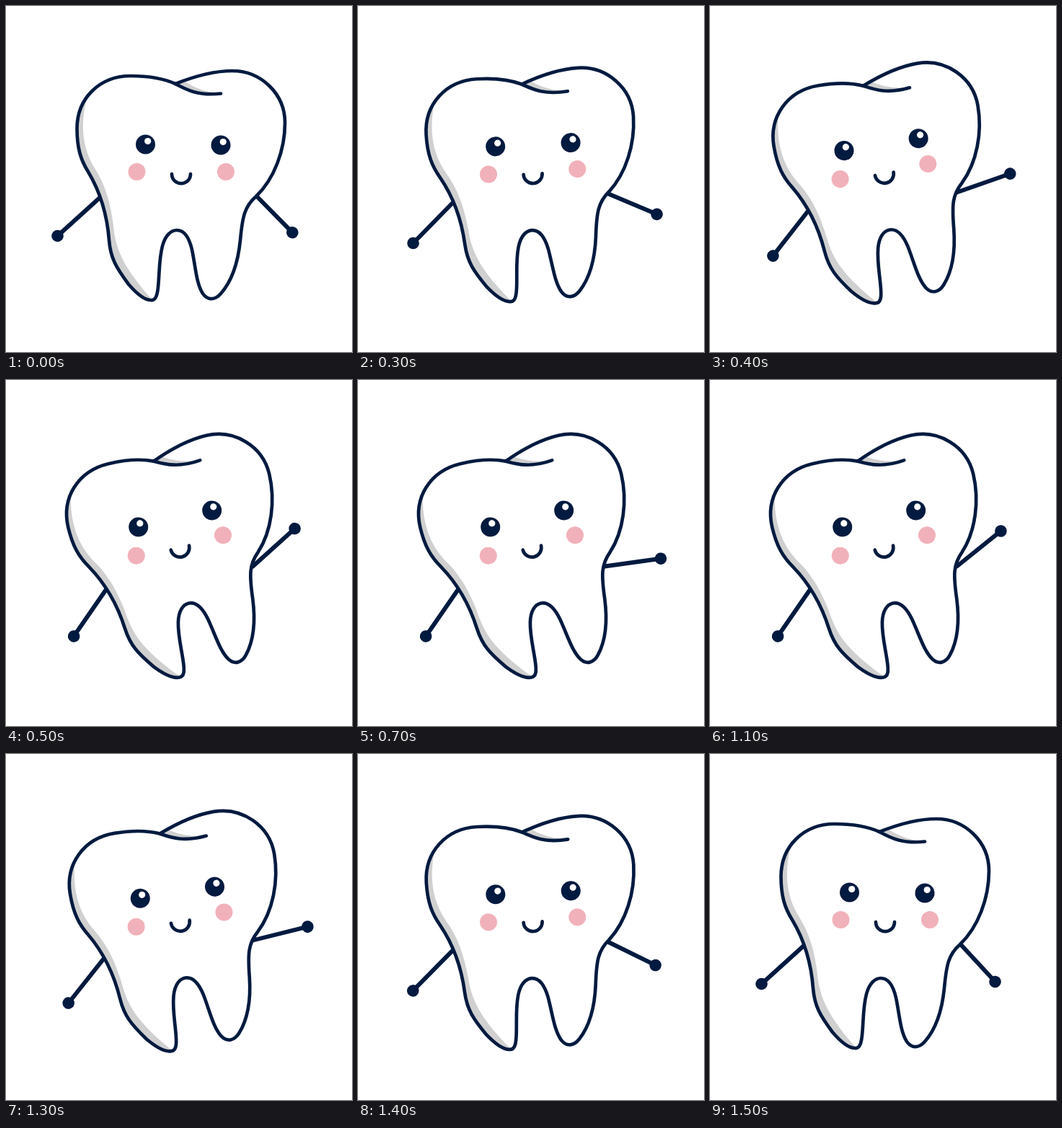
An HTML page that plays this animation: 480 px wide and 480 px high, repeating every 2 s.

```html
<!DOCTYPE html>
<html lang="en">
<head>
<meta charset="utf-8">
<title>Waving tooth</title>
<style>
  html, body { margin: 0; width: 100%; height: 100%; overflow: hidden; background: #fff; }
  svg { display: block; width: 100vw; height: 100vh; }
  .line { fill: none; stroke: #011a3f; stroke-width: 4.7; stroke-linecap: round; stroke-linejoin: round; }
  .arm { stroke-width: 5.9; }
  .ink { fill: #011a3f; }
  .shade { fill: #d0d0d0; }
  .blush { fill: #f1b1ba; }
  .white { fill: #fff; }
</style>
</head>
<body>
<svg viewBox="0 0 480 480">
  <defs>
    <path id="tooth" d="M235 108 C213 98 190 97 173 97 C130 97 98.5 128 98.5 170
      C98.5 198 104 214 114 230 C129 255 140 285 143 325 C145 350 153 363 170 386
      C182 400 193 408 201 408 C208 409 210 400 211 390 C213 372 212 352 217 333
      C221 318 229 311 237 311 C247 311 254 321 258 338 C263 362 264 385 273 399
      C280 409 290 408 298 399 C313 382 322 355 325 325 C328 292 331 278 347 264
      C372 240 387 200 387 162 C387 122 354 90 314 90 C286 90 260 98 235 108Z"/>
    <clipPath id="inside"><use href="#tooth"/></clipPath>
  </defs>

  <g id="wave">
    <path class="line arm" d="M0 0H78"/>
    <circle class="ink" cx="78.2" r="8.3"/>
  </g>

  <g id="body">
    <path class="line arm" d="M140 257L71.5 319"/>
    <circle class="ink" cx="71.5" cy="319" r="8.3"/>
    <use href="#tooth" class="white"/>
    <g clip-path="url(#inside)">
      <path class="shade" d="M113 124 C102 165 106 197 123 225 C139 250 145 275 149 305
        C152 340 166 366 203 408 L150 420 L85 250 L90 130Z"/>
      <path class="shade" d="M235 108 L247 104 C256 110 268 117 292 121 C266 124 250 116 235 108Z"/>
    </g>
    <use href="#tooth" class="line"/>
    <path class="line" d="M235 108C250 116 266 125 298 121.5"/>
    <circle class="ink" cx="193.5" cy="192" r="13.5"/>
    <circle class="white" cx="196.7" cy="187.5" r="4.6"/>
    <circle class="ink" cx="298" cy="193" r="13.5"/>
    <circle class="white" cx="301.2" cy="188.5" r="4.6"/>
    <circle class="blush" cx="181.5" cy="230" r="12"/>
    <circle class="blush" cx="305" cy="230" r="12"/>
    <path class="line" d="M230 233.2a13 13 0 0 0 26 0"/>
  </g>
</svg>
<script>
  const LOOP = 2000, STEP = 100;

  // [ms, degrees]
  const TILT = [[0, 0], [200, 0], [500, -13.25], [1190, -13.25], [1500, 0], [LOOP, 0]];
  const WAVE = [[0, 45.5], [200, 45.5], [500, -42], [800, 4], [1100, -38.8],
                [1190, -38.8], [1500, 47.3], [LOOP, 47.3]];

  const ease = p => p * p * (3 - 2 * p);

  function angleAt(keys, t) {
    const i = keys.findIndex(k => k[0] > t);
    const [t0, a] = keys[i - 1], [t1, b] = keys[i];
    return a + (b - a) * ease((t - t0) / (t1 - t0));
  }

  const body = document.getElementById('body');
  const wave = document.getElementById('wave');
  const start = performance.now();

  function draw(now) {
    const time = Math.max(0, now - start) % LOOP;
    const t = Math.floor(time / STEP) * STEP;
    body.setAttribute('transform', `rotate(${angleAt(TILT, t)} 240 240)`);
    wave.setAttribute('transform', `translate(342.5 258.5) rotate(${angleAt(WAVE, t)})`);
    requestAnimationFrame(draw);
  }
  draw(start);
</script>
</body>
</html>
```
